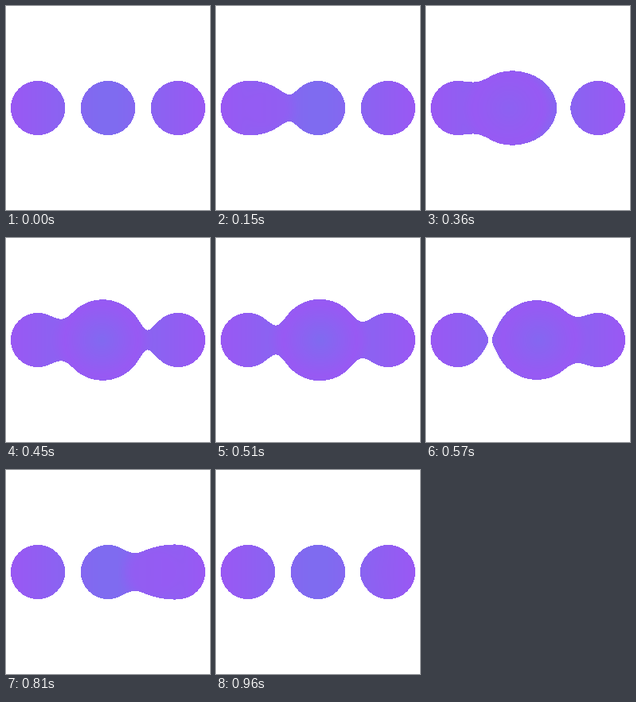
Write an HTML page with a canvas that moves like this. It is 256 px wide and 256 px high and loops after 990 ms.

```html
<!DOCTYPE html>
<html lang="en">
<head>
<meta charset="utf-8">
<title>Gooey loader</title>
<style>
  html, body { margin: 0; width: 100%; height: 100%; overflow: hidden; background: #fff; }
  canvas { display: block; width: 100vw; height: 100vh; }
</style>
</head>
<body>
<canvas id="stage" width="256" height="256"></canvas>
<script>
  const SIZE = 256, MID = 128, LOOP = 990, STEP = 30;
  const DOTS = [128, 40, 216], DOT_R = 34, BALL_R = 50.5;
  const BLEND = 25;
  const PURPLE = [152, 89, 243], BLUE = [127, 107, 240];

  const ctx = document.getElementById('stage').getContext('2d');
  const image = ctx.createImageData(SIZE, SIZE);

  const clamp = v => Math.min(1, Math.max(0, v));
  const smooth = v => v * v * (3 - 2 * v);

  // Smooth union of two signed distances
  function join(a, b) {
    const h = Math.max(0, 1 - Math.abs(a - b) / BLEND);
    return Math.min(a, b) - h * h * BLEND / 4;
  }

  function draw(time) {
    const phase = time / LOOP;
    const swell = Math.sin(Math.PI * phase);
    const ballX = DOTS[1] + (DOTS[2] - DOTS[1]) * phase;
    const ballR = BALL_R * swell;
    const core = swell ** 8;
    const strength = Math.min(1, 1.3 * swell);

    image.data.fill(0);
    for (let row = 0; row < SIZE; row++) {
      const y = row + 0.5 - MID;
      for (let col = 0; col < SIZE; col++) {
        const x = col + 0.5;
        const toBall = Math.hypot(x - ballX, y);
        const ball = toBall - ballR;
        const d = DOTS.reduce((sum, cx) => join(sum, Math.hypot(x - cx, y) - DOT_R), ball);
        if (d >= 0) continue;

        // Share of blue: backdrop fades to the sides, the ball covers it
        const back = clamp(1.1 - Math.abs(x - MID) / 105);
        const front = core * clamp(1 - toBall / 46);
        const cover = strength * smooth(clamp(0.75 - ball / BLEND));
        const blue = back + (front - back) * cover;

        const at = 4 * (row * SIZE + col);
        for (let i = 0; i < 3; i++) image.data[at + i] = PURPLE[i] + (BLUE[i] - PURPLE[i]) * blue;
        image.data[at + 3] = 255;
      }
    }
    ctx.putImageData(image, 0, 0);
  }

  const start = performance.now();
  let shown = -1;
  function tick() {
    const elapsed = Math.max(0, performance.now() - start);
    const time = Math.floor((elapsed % LOOP) / STEP) * STEP;
    if (time !== shown) draw(shown = time);
    requestAnimationFrame(tick);
  }
  tick();
</script>
</body>
</html>
```
